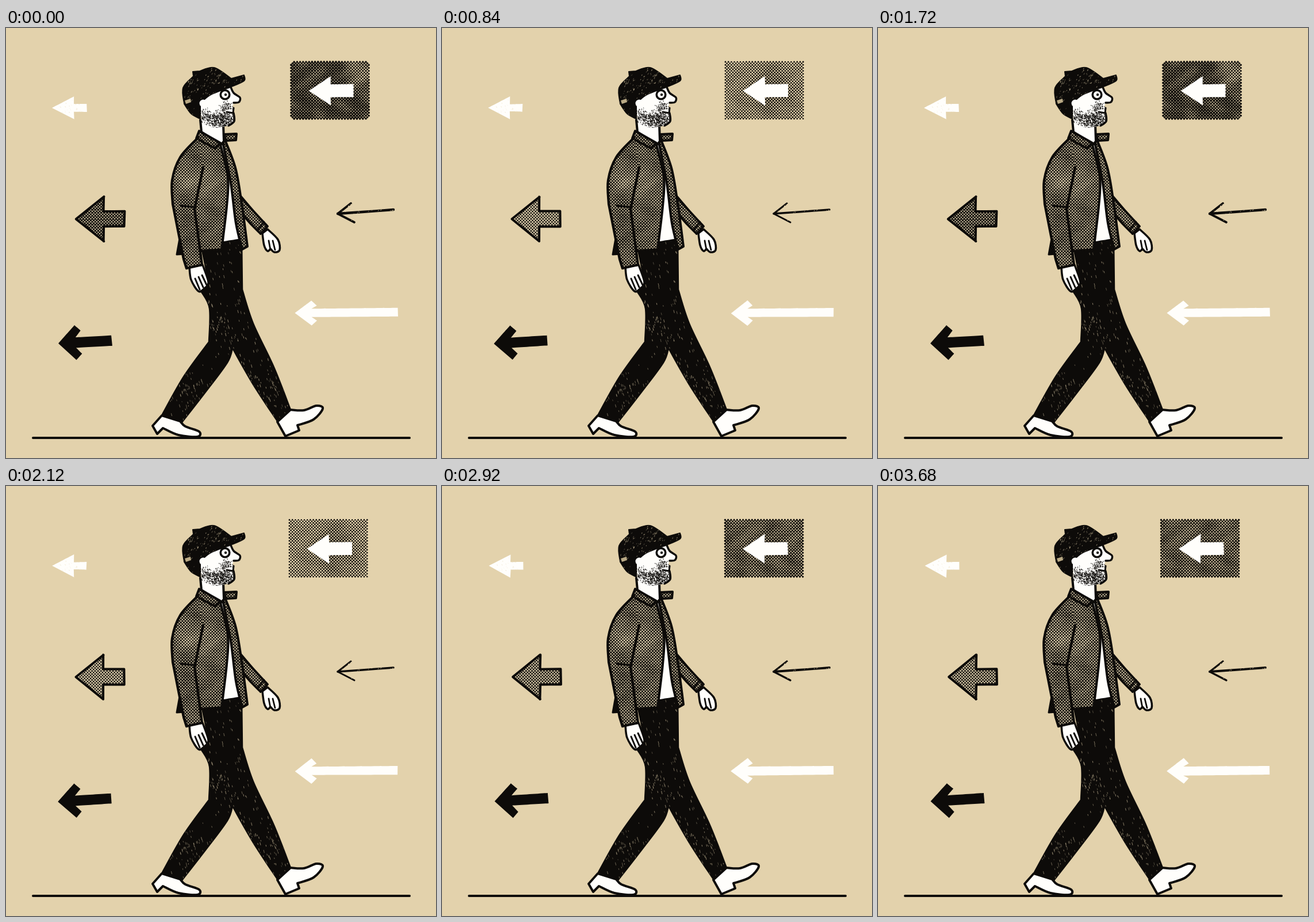
Recreate the animation shown at these times as an HTML page with a canvas. Size 748 px wide and 748 px high, loop 3.72 s.

```html
<!DOCTYPE html>
<html lang="en">
<head>
<meta charset="utf-8">
<title>Walking against the arrows</title>
<style>
  html, body { margin: 0; width: 100%; height: 100%; overflow: hidden; background: #e3d2ac; }
  canvas { position: absolute; left: 0; top: 0; width: 748px; height: 748px; visibility: hidden; }
</style>
</head>
<body>
<script>
const SIZE = 748, LOOP = 3720, STEP = 40, BOIL_RATE = 8.8, PITCH = 5.2;
const PAPER = '#e3d2ac', CLOTH = '#d3c5a4', INK = '#0d0b09', WHITE = '#fffefb';

function rng(seed) {
  return () => {
    seed = (seed * 1664525 + 1013904223) % 4294967296;
    return seed / 4294967296;
  };
}

const blob = (x, y, cx, cy, r) => Math.exp(-((x - cx) ** 2 + (y - cy) ** 2) / (r * r));
const cloud = (x, y) => Math.sin(x * .11 + Math.sin(y * .07) * 2) * Math.sin(y * .09 + x * .03);

// Smooth curve through the key points; a slash makes the point before it a corner.
function outline(keys, open) {
  const path = new Path2D(), all = [];
  for (const part of keys.split('/')) {
    const n = part.trim().split(/\s+/).map(Number), run = all.slice(-1);
    for (let i = 0; i < n.length; i += 2) run.push([n[i], n[i + 1]]);
    if (!all.length) { path.moveTo(...run[0]); all.push(run[0]); }
    for (let i = 1; i < run.length; i++) {
      const b = run[i - 1], c = run[i], a = run[i - 2] || b, d = run[i + 1] || c;
      path.bezierCurveTo(b[0] + (c[0] - a[0]) / 6, b[1] + (c[1] - a[1]) / 6,
        c[0] - (d[0] - b[0]) / 6, c[1] - (d[1] - b[1]) / 6, ...c);
      all.push(c);
    }
  }
  if (!open) path.closePath();
  const xs = all.map(p => p[0]), ys = all.map(p => p[1]);
  const box = [Math.min(...xs) - 3, Math.min(...ys) - 3, Math.max(...xs) + 3, Math.max(...ys) + 3];
  return { path, box };
}

function paint(c, { path }, fill, width = 0) {
  if (fill) { c.fillStyle = fill; c.fill(path); }
  if (width) { c.lineWidth = width; c.strokeStyle = INK; c.stroke(path); }
}

const shape = (c, keys, fill, width) => paint(c, outline(keys), fill, width);
const line = (c, keys, width) => paint(c, outline(keys, true), null, width);

function disc(c, x, y, r, fill, width) {
  const path = new Path2D();
  path.arc(x, y, r, 0, 7);
  paint(c, { path }, fill, width);
}

// Staggered dots sized so that they cover the given share of the area.
function halftone(c, { path, box: [x0, y0, x1, y1] }, cover, whole) {
  c.save();
  const inked = new Path2D();
  for (let y = y0, row = 0; y < y1; y += PITCH / 2, row++) {
    for (let x = x0 + row % 2 * PITCH / 2; x < x1; x += PITCH) {
      if (whole && !c.isPointInPath(path, x, y)) continue;
      const r = PITCH * Math.sqrt(cover(x, y) / (2 * Math.PI));
      inked.moveTo(x + r, y);
      inked.arc(x, y, r, 0, 7);
    }
  }
  if (!whole) c.clip(path);
  paint(c, { path: inked }, INK);
  c.restore();
}

// Random short marks, kept where the density function allows.
function grain(c, { path, box: [x0, y0, x1, y1] }, count, color, density, len, slant) {
  const rand = rng(count);
  c.save();
  c.clip(path);
  c.strokeStyle = color;
  for (let i = 0; i < count; i++) {
    const x = x0 + rand() * (x1 - x0), y = y0 + rand() * (y1 - y0), l = len * (.3 + rand());
    if (rand() > density(x, y)) continue;
    c.lineWidth = .5 + rand() * .8;
    c.beginPath();
    c.moveTo(x, y);
    c.lineTo(x + l * slant, y + l);
    c.stroke();
  }
  c.restore();
}

const weave = (x, y) => .68 + .07 * cloud(x, y)
  - .25 * blob(x, y, 313, 264, 20) - .15 * blob(x, y, 360, 270, 28);

function cloth(c, keys, width = 4) {
  const o = outline(keys);
  paint(c, o, CLOTH);
  halftone(c, o, weave);
  paint(c, o, null, width);
}

function drawLegs(c) {
  const legs = outline(`341 386 / 352 440 / 340 459 / 354 488 353 546 / 310 605 272 672 / 306 686 /
    348 632 385 582 394 557 / 430 620 472 684 / 495 664 / 466 590 430 514 411 455 / 410 364 / 378 366`);
  paint(c, legs, INK, 2.5);
  const worn = (x, y) => .06 + .2 * Math.max(0, cloud(x * 1.4, y * .8))
    + .35 * blob(x, y, 380, 515, 26) + .4 * blob(x, y, 312, 637, 24) + .35 * blob(x, y, 460, 625, 27);
  grain(c, legs, 4600, 'rgba(227,210,172,.5)', worn, 3.5, .25);
  shape(c, '271 674 / 255 692 / 263 706 / 273 696 / 300 708 333 711 336 702 312 693 303 684', WHITE, 4);
  shape(c, '472 685 / 486 710 / 510 700 / 507 691 / 535 681 551 662 540 657 518 665 495 664', WHITE, 4);
}

function drawTorso(c) {
  shape(c, '446 357 / 449 378 455 388 460 384 / 467 390 476 386 473 368 455 350', WHITE, 3.5);
  for (let i = 0; i < 2; i++) line(c, `${460 + 8 * i} 386 / ${457 + 7 * i} 370`, 2.8);
  cloth(c, '407 291 / 430 318 455 345 / 443 358 / 428 343 413 326');
  line(c, '438 351 / 449 337', 2.5);

  shape(c, '372 202 / 380 201 / 395 270 404 367 / 379 371 / 386 260', WHITE);
  cloth(c, '379 190 / 399 243 410 305 420 380 / 411 385 / 400 340 391 270 378 203');
  shape(c, '338 160 / 340 181 / 374 203 / 379 197 / 378 168', WHITE, 4);
  shape(c, '302 366 / 297 394 / 312 393', INK, 3);
  cloth(c, '338 186 / 308 230 302 300 / 304 388 / 341 388 / 375 385 / 384 310 386 260 373 203');
  cloth(c, '336 179 / 373 200 / 363 209 / 331 192');
  cloth(c, '379 185 / 401 184 / 400 195 / 383 196');

  shape(c, '319 416 / 322 438 335 458 345 453 352 442 342 412', WHITE, 3.5);
  for (let i = 0; i < 3; i++) line(c, `${337 + 6 * i} ${455 - 4 * i} / ${329 + 6 * i} ${436 - 3 * i}`, 3);
  const sleeve = '334 191 303 225 289 265 290 306 / 309 402 / 314 418 / 341 412 / 328 315 / 343 242';
  cloth(c, sleeve, 0);
  line(c, sleeve, 4.3);
  line(c, '304 309 / 330 312', 3.5);
}

function drawHead(c) {
  const face = outline(`338 122 / 391 103 / 396 113 407 121 405 129 396 130 / 394 136 / 397 141 /
    396 148 / 397 162 385 170 360 173 340 164`);
  paint(c, face, WHITE);
  const beard = (x, y) => 1.1 * blob(x, y, 382, 159, 16) + .75 * blob(x, y, 346, 154, 12)
    + .7 * blob(x, y, 363, 162, 11) + .75 * blob(x, y, 383, 136, 8) - .12;
  grain(c, face, 4200, INK, beard, 1.3, .4);
  line(c, '391 103 / 396 113 407 121 405 129 396 130', 3.5);
  line(c, '396 148 / 397 162 387 170', 3.5);
  shape(c, '381 143 / 395 141 / 395 148 / 386 149', WHITE);
  line(c, '384 146 / 395 148 / 396 139', 3);
  disc(c, 381, 116, 7.8, WHITE, 3.6);
  disc(c, 382, 116, 2.2, INK);

  const cap = outline(`310 132 / 308 104 326 84 / 325 76 / 337 75 / 362 69 392 88 / 414 82 /
    414 92 390 103 / 356 116 338 131 / 338 158 / 322 149 310 132`);
  paint(c, cap, INK, 2);
  const faded = (x, y) => .04 + .35 * blob(x, y, 367, 82, 15) + .25 * blob(x, y, 335, 99, 20);
  grain(c, cap, 1500, 'rgba(227,210,172,.5)', faded, 1.6, -.6);
  shape(c, '311 126 / 321 123 / 322 129 / 313 132', '#b9a985');
  disc(c, 343, 131, 6.5, WHITE);
}

// Left-pointing arrow: barb 0 gives a block head, more gives a chevron.
function arrow({ x, y, len, head, half, shaft, barb = 0, tilt = 0 }, rand) {
  const side = s => [[head, s * half], [head + barb, s * (half - barb)], [head, s * shaft], [len, s * shaft]];
  const keys = [[0, 0], ...side(-1), ...side(1).reverse()].map(([u, v]) => {
    const px = x + u - v * tilt + rand() - .5, py = y + v + u * tilt + rand() - .5;
    return px + ' ' + py;
  });
  return outline(keys.join(' / '));
}

const poses = [
  { dx: 0, signDx: 2, round: 7, pen: 4.4, print: .7,
    cover: (x, y) => .82 + .1 * cloud(x, y) - .25 * blob(x, y, 618, 76, 27) },
  { dx: -.6, signDx: -1, round: 0, pen: 3.5, print: .45,
    cover: (x, y) => .44 + .05 * cloud(x, y) + .2 * blob(x, y, 570, 110, 42) },
  { dx: .8, signDx: -1.5, round: 0, pen: 3.9, print: .52,
    cover: (x, y) => .71 + .08 * cloud(x, y) }
];

function drawArrows(c, { dx, signDx, round, pen, print, cover }, seed) {
  const rand = rng(seed);
  const left = 494 + signDx, box = [left, 59, left + 136, 160], path = new Path2D();
  path.roundRect(left - 1, 58, 137, 103, round);
  halftone(c, { path, box }, cover, true);
  paint(c, arrow({ x: 525 + signDx, y: 109, len: 78, head: 38, half: 26, shaft: 11 }, rand), WHITE);

  const block = arrow({ x: 122 + dx, y: 332, len: 84, head: 48, half: 38.5, shaft: 13.3 }, rand);
  paint(c, block, CLOTH);
  halftone(c, block, () => print);
  paint(c, block, null, 4);

  const small = arrow({ x: 80.5 + dx, y: 139, len: 60, head: 38, half: 20, shaft: 6.5 }, rand);
  paint(c, small, WHITE);
  grain(c, small, 90, 'rgba(227,210,172,.4)', () => .6, 1.2, 1);
  paint(c, arrow({ x: 91 + dx, y: 549, len: 93, head: 30, half: 30, shaft: 9, barb: 10, tilt: -.06 }, rand), INK);
  paint(c, arrow({ x: 502.5, y: 496, len: 179, head: 29, half: 22, shaft: 7.5, barb: 9, tilt: -.008 }, rand), WHITE);

  const thin = '600 305 / 577 323 / 606 338';
  line(c, thin, pen * .85);
  line(c, '577 323 / 620 320 674 316', pen);
  grain(c, outline(thin + ' / 676 318 / 676 312'), 240, PAPER, () => .3, 1, -.6);
}

function layer(draw) {
  const el = document.createElement('canvas');
  el.width = el.height = SIZE;
  const c = el.getContext('2d');
  c.lineJoin = c.lineCap = 'round';
  draw(c);
  return document.body.appendChild(el);
}

layer(c => {
  line(c, '47 713 / 702 713', 4);
  drawLegs(c);
  drawTorso(c);
  drawHead(c);
}).style.visibility = 'visible';

const layers = poses.map((pose, i) => layer(c => drawArrows(c, pose, 60 + i)));

function tick(now) {
  const t = Math.floor((now % LOOP) / STEP) * STEP / 1000;
  const shown = Math.floor(t * BOIL_RATE + .5) % layers.length;
  layers.forEach((el, i) => { el.style.visibility = i === shown ? 'visible' : 'hidden'; });
  requestAnimationFrame(tick);
}

tick(0);
</script>
</body>
</html>
```
